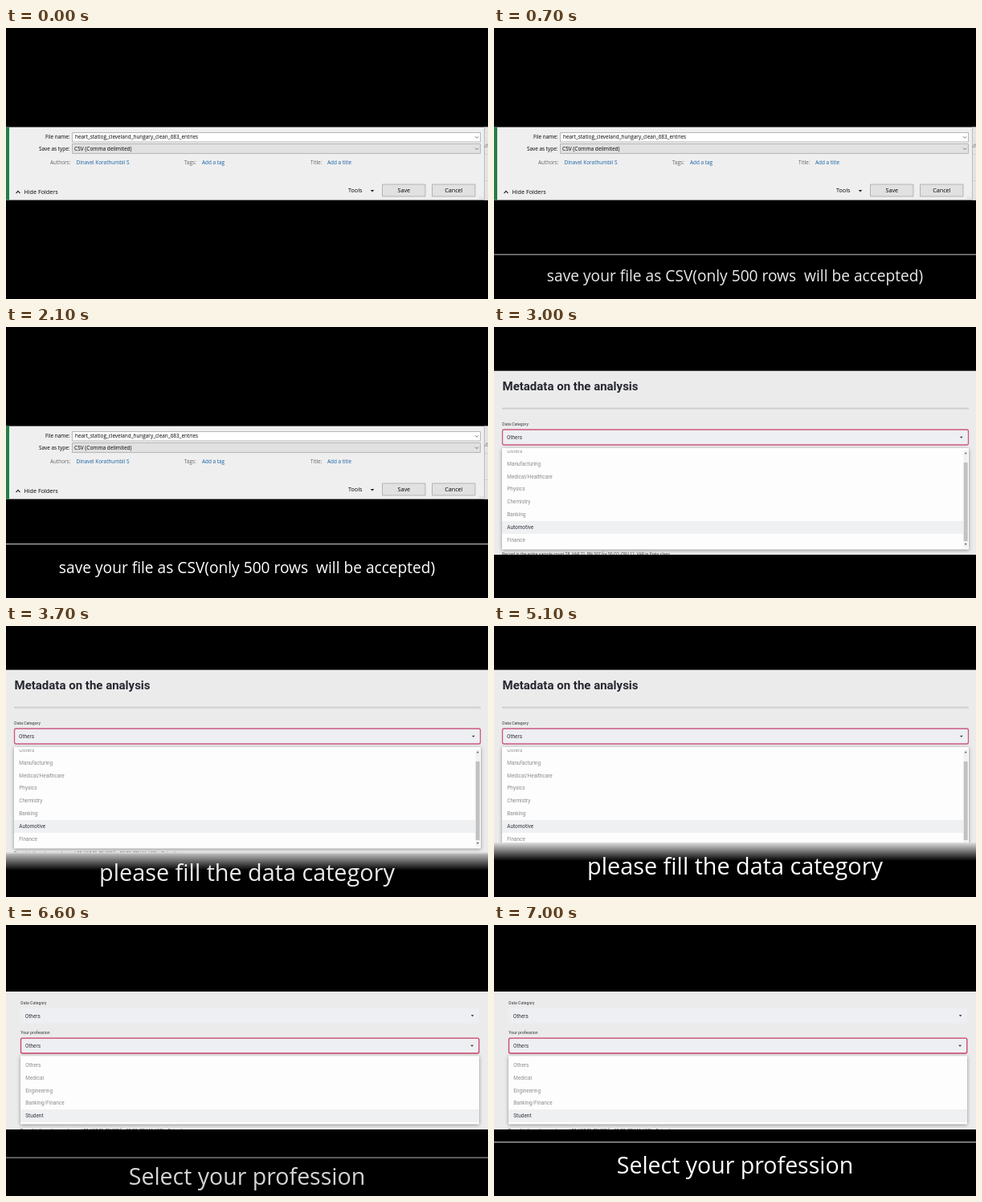
An HTML page with a canvas for the animation above (8 s loop, 600 px wide and 338 px high).

```html
<!DOCTYPE html>
<html lang="en">
<head>
<meta charset="utf-8">
<title>Upload steps</title>
<style>
html, body { margin: 0; width: 100%; height: 100%; overflow: hidden; background: #000; }
canvas { display: block; width: 600px; height: 338px; }
</style>
</head>
<body>
<canvas id="stage"></canvas>
<script>
const W = 600, H = 338, LOOP = 8000, STEP = 100;
const DIALOG = '"Open Sans", "Noto Sans", sans-serif';
const FORM = 'Roboto, Inter, sans-serif';
const canvas = document.getElementById('stage');
const ctx = canvas.getContext('2d');
const dpr = window.devicePixelRatio || 1;
canvas.width = W * dpr;
canvas.height = H * dpr;

function rect(x, y, w, h, fill) {
  ctx.fillStyle = fill;
  ctx.fillRect(x, y, w, h);
}

function box(x, y, w, h, fill, stroke, line = 1, radius = 0) {
  ctx.beginPath();
  ctx.roundRect(x, y, w, h, radius);
  ctx.fillStyle = fill;
  ctx.fill();
  if (!stroke) return;
  ctx.strokeStyle = stroke;
  ctx.lineWidth = line;
  ctx.stroke();
}

function text(str, x, y, font, color, align = 'left') {
  ctx.font = font;
  ctx.fillStyle = color;
  ctx.textAlign = align;
  ctx.fillText(str, x, y);
}

// Filled triangle; a negative height points up.
function triangle(x, y, w, h, color) {
  ctx.fillStyle = color;
  ctx.beginPath();
  ctx.moveTo(x - w / 2, y - h / 2);
  ctx.lineTo(x + w / 2, y - h / 2);
  ctx.lineTo(x, y + h / 2);
  ctx.fill();
}

function chevron(x, y, w, h, color, line = 0.8) {
  ctx.strokeStyle = color;
  ctx.lineWidth = line;
  ctx.beginPath();
  ctx.moveTo(x - w / 2, y - h / 2);
  ctx.lineTo(x, y + h / 2);
  ctx.lineTo(x + w / 2, y - h / 2);
  ctx.stroke();
}

function clipped(x, y, w, h, draw) {
  ctx.save();
  ctx.beginPath();
  ctx.rect(x, y, w, h);
  ctx.clip();
  draw();
  ctx.restore();
}

function saveDialog() {
  const small = '6.4px ' + DIALOG, large = '7.2px ' + DIALOG;
  const dark = '#000', gray = '#666', blue = '#1560a4';
  const top = 123.6, height = 91;

  rect(0, top, W, height, '#efefef');
  rect(0, top, 4, height, '#237d49');
  rect(595, top, 5, height, '#e4e4e4');
  rect(595, top, 1, height, '#bdbdbd');
  rect(596, 157, 4, 1, '#cfcfcf');
  rect(596, 190, 4, 1, '#cfcfcf');
  clipped(595, 140, 5, 12, () => text('ut', 594, 149, small, '#777'));

  box(82.5, 130.5, 508, 11.5, '#fff', '#b0b0b0', 0.9);
  box(82.5, 144.5, 508, 12, '#e1e1e1', '#b0b0b0', 0.9);
  chevron(586, 136.3, 4, 2, '#555');
  chevron(586, 150.7, 4, 2, '#555');

  text('File name:', 79.5, 138.2, small, dark, 'right');
  text('Save as type:', 79.5, 152.7, small, dark, 'right');
  text('heart_statlog_cleveland_hungary_clean_683_entries', 86, 138, small, dark);
  text('CSV (Comma delimited)', 85, 152.7, '6.55px ' + DIALOG, dark);

  text('Authors:', 55, 170, small, gray);
  text('Dinavel Korathumbil S', 87.5, 170, small, blue);
  text('Tags:', 222, 170, small, gray);
  text('Add a tag', 244, 170, small, blue);
  text('Title:', 379, 170, small, gray);
  text('Add a title', 400, 170, small, blue);

  chevron(15, 204.8, 5, -2.8, '#222', 1.1);
  text('Hide Folders', 22.5, 207.3, large, dark);
  text('Tools', 426, 205.3, large, dark);
  triangle(456, 203.2, 4.6, 2.6, '#222');
  box(468.5, 195, 53.5, 15, '#e1e1e1', '#adadad', 0.9);
  box(530.5, 195, 53.5, 15, '#e1e1e1', '#adadad', 0.9);
  text('Save', 495.3, 205.3, large, dark, 'center');
  text('Cancel', 557.3, 205.3, large, dark, 'center');
  for (let i = 0; i < 3; i++) rect(593 - i * 1.8, 211.5, 0.9, 0.9, '#b5b5b5');
}

function select(x, y, w, h, border) {
  box(x, y, w, h, '#eeeff2', border, 1.3, 2);
  text('Others', x + 5.5, y + h / 2 + 2.5, '6.45px ' + FORM, '#33353d');
  triangle(x + w - 8.7, y + h / 2 + 0.2, 3.6, 2, '#222');
}

function panel(x, y, w, h) {
  ctx.save();
  ctx.shadowColor = 'rgba(0,0,0,0.4)';
  ctx.shadowBlur = 4 * dpr;
  ctx.shadowOffsetY = dpr;
  box(x, y, w, h, '#fdfdfd', null, 0, 1);
  ctx.restore();
}

// Rows 16 px apart; the active one has a tinted background.
function options(names, active, x, y, w) {
  names.forEach((name, i) => {
    const cy = y + i * 15.95, on = name === active;
    if (on) rect(x, cy - 8, w, 16, '#eff0f2');
    text(name, x + 6.3, cy + 2.3, '6.45px ' + FORM, on ? '#33353d' : '#8b8c90');
  });
}

function footnote(x, y) {
  text('Record in the entire sample count 28, VAR 21, BN 307 for 50 CO, CPU 11, VAR in Entry class', x, y, '5.2px ' + FORM, '#44464d');
}

function categoryForm() {
  const top = 54.7, height = 229.3;
  rect(0, top, W, height, '#ebebeb');
  text('Metadata on the analysis', 10.5, 79.4, 'bold 15px ' + FORM, '#262730');
  rect(10, 100.7, 581, 1.8, '#cccccc');
  text('Data Category', 10.3, 123.4, '5.15px ' + FORM, '#33353d');
  select(10.5, 128, 580, 19, '#cb5a80');
  clipped(0, top, W, height, () => footnote(10, 285));
  panel(10, 151, 581, 126.5);
  clipped(10, 153.7, 581, 123.8, () => {
    options(['Others', 'Manufacturing', 'Medical/Healthcare', 'Physics', 'Chemistry',
      'Banking', 'Automotive', 'Finance'], 'Automotive', 10, 154.3, 574);
    rect(584.5, 153.7, 5.5, 121.3, '#f1f1f1');
    rect(584.7, 169, 5, 98, '#c2c2c2');
    triangle(587.2, 157.3, 3, -2, '#555');
    triangle(587.2, 271, 3, 2, '#555');
  });
}

function professionForm() {
  rect(0, 83, W, 172, '#ebebeb');
  clipped(0, 83, W, 172, () => {
    text('Data Category', 18.3, 98.8, '5.1px ' + FORM, '#33353d');
    select(18.3, 103.5, 571, 19);
    text('Your profession', 18.3, 136.4, '5.2px ' + FORM, '#33353d');
    select(18.5, 141.2, 570.3, 18.8, '#c93e68');
    footnote(18, 258.2);
    panel(18, 163.2, 571, 85.3);
    options(['Others', 'Medical', 'Engineering', 'Banking/Finance', 'Student'],
      'Student', 18, 174.3, 571);
  });
}

// Band and words rise together, decelerating; the words travel less far.
// The band's top edge falls from light gray to black over `edge` pixels.
function caption({ str, size, base, edge }, t) {
  const p = Math.min(1, (t - 200) / 850);
  if (p <= 0) return;
  const rest = (1 - p) ** 2;
  const top = 270 + 70 * rest;
  const shade = ctx.createLinearGradient(0, top, 0, top + edge);
  shade.addColorStop(0, '#e0e0e0');
  shade.addColorStop(1, '#000');
  ctx.globalAlpha = 1 - rest ** 1.4;
  rect(0, top, W, H - top, shade);
  text(str, W / 2, base + 50 * rest, size + 'px ' + DIALOG, '#fff', 'center');
  ctx.globalAlpha = 1;
}

const scenes = [
  { start: 0, draw: saveDialog, caption: {
    str: 'save your file as CSV(only 500 rows \u00a0will be accepted)', size: 19.15, base: 307.3, edge: 2 } },
  { start: 3000, draw: categoryForm, caption: {
    str: 'please fill the data category', size: 28.8, base: 309.6, edge: 23 } },
  { start: 6000, draw: professionForm, caption: {
    str: 'Select your profession', size: 28.5, base: 309.6, edge: 2 } }
];

function render(t) {
  const scene = scenes.findLast(s => t >= s.start);
  ctx.setTransform(dpr, 0, 0, dpr, 0, 0);
  rect(0, 0, W, H, '#000');
  scene.draw();
  caption(scene.caption, t - scene.start);
}

const begin = performance.now();
function tick() {
  const t = (performance.now() - begin) % LOOP;
  render(Math.floor(t / STEP) * STEP);
  requestAnimationFrame(tick);
}
tick();
</script>
</body>
</html>
```
